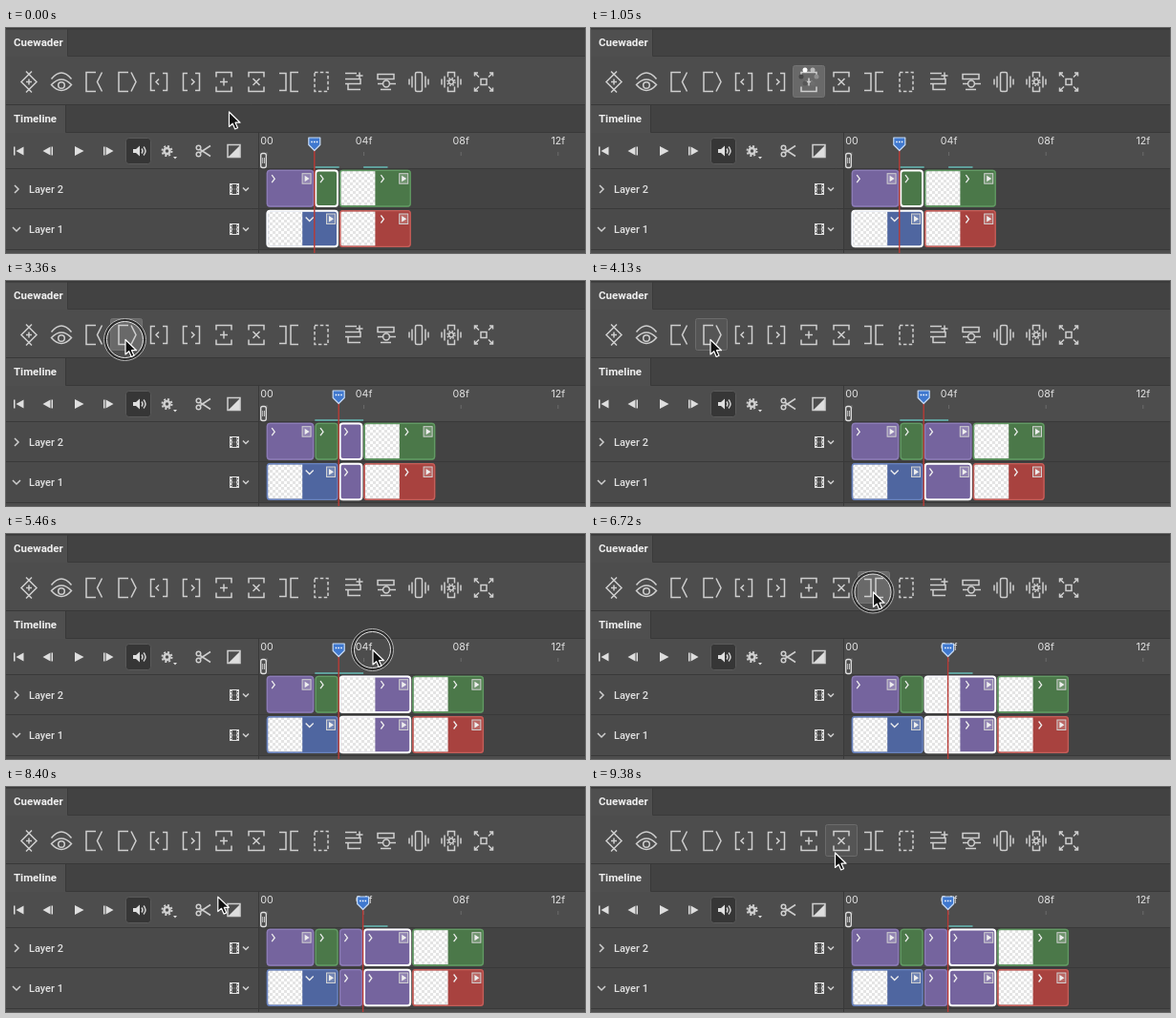
These frames come from a looping animation (606x236 px, 9.45 s). An HTML page:

```html
<!DOCTYPE html>
<html lang="en">
<head>
<meta charset="utf-8">
<title>Timeline panel</title>
<style>
  html, body { margin: 0; width: 100%; height: 100%; overflow: hidden; background: #4d4d4d; }
  svg { display: block; width: 606px; height: 236px; }
  text { font-family: Roboto, Inter, sans-serif; fill: #e2e2e2; }
  .tab { font-size: 11.5px; font-weight: 700; fill: #f0f0f0; }
  .layer { font-size: 11px; font-weight: 500; }
  .ruler { font-family: Inter, Roboto, sans-serif; font-size: 10.7px; text-anchor: middle; }
  .clip-name { font-size: 11px; font-weight: 700; fill: #fff; }
  .line { fill: none; stroke: #cfcfcf; stroke-width: 1.5; }
  .solid { fill: #dedede; }
</style>
</head>
<body>
<svg viewBox="0 0 606 236">
  <defs>
    <pattern id="checker" width="6" height="6" patternUnits="userSpaceOnUse">
      <rect width="6" height="6" fill="#fdfdfd"/>
      <path d="M0 0h3v3H0zM3 3H6V6H3z" fill="#e4e4e4"/>
    </pattern>
  </defs>

  <!-- panels -->
  <rect width="606" height="236" fill="#4d4d4d"/>
  <rect width="606" height="29" fill="#424242"/>
  <rect width="64" height="30" fill="#4f4f4f"/>
  <rect width="606" height="1.5" fill="#383838"/>
  <path d="M64.5 1V29.5H606" fill="none" stroke="#3a3a3a"/>
  <rect y="80" width="606" height="29" fill="#424242"/>
  <rect y="81" width="62" height="29" fill="#4f4f4f"/>
  <path d="M0 80.5H606M62.5 81V109.5H606" fill="none" stroke="#383838"/>
  <text class="tab" x="8" y="19">Cuewader</text>
  <text class="tab" x="8" y="99">Timeline</text>
  <rect y="148" width="264" height="84" fill="#4a4a4a"/>
  <rect x="265" y="148" width="341" height="84" fill="#434343"/>
  <path d="M264.5 110V236M0 147.5H606M0 189.5H606M0 232.5H606" stroke="#393939"/>

  <g id="hover"><rect x="-16.5" y="39.5" width="33" height="33" rx="2"/></g>
  <g id="tools" class="line"></g>

  <!-- transport controls -->
  <rect x="125.5" y="115.5" width="26" height="27" rx="3" fill="#363636" stroke="#5a5a5a"/>
  <g class="solid">
    <path d="M8 124.5h1.500v9H8zM18.500 124.500v9l-8-4.500z"/>
    <path d="M46.500 124.500v9l-8-4.500zM47.500 124.500H49v9h-1.500z"/>
    <path d="M72 124l9.500 5-9.500 5z"/>
    <path d="M102 124.500h1.500v9H102zM104.500 124.500v9l8-4.500z"/>
    <path d="M133 127h3l4-3.500v11l-4-3.500h-3z"/>
    <path d="M175 135h4l-2 2.500z"/>
    <path d="M245 123V136H232z"/>
  </g>
  <g class="line">
    <path d="M142 126.500q2 2.500 0 5M144 124.500q4 4.500 0 9"/>
    <circle cx="168.500" cy="129" r="3" stroke-width="2.600"/>
    <circle cx="168.500" cy="129" r="5" stroke-width="2" stroke-dasharray="2 1.927"/>
    <path d="M214 123.500L202.500 131M214 134.500L202.500 127"/>
    <circle cx="201.500" cy="125.500" r="2.300"/><circle cx="201.500" cy="132.500" r="2.300"/>
    <rect x="232" y="122.500" width="13" height="13"/>
    <path d="M9 165l4 4-4 4M7 209l4 4 4-4"/>
  </g>
  <text class="layer" x="24" y="173">Layer 2</text>
  <text class="layer" x="24" y="215">Layer 1</text>
  <g id="films"></g>

  <g id="ruler"></g>
  <rect x="266.700" y="131.500" width="5.600" height="15" rx="2" fill="#4d4d4d" stroke="#e0e0e0" stroke-width="1.300"/>
  <path d="M268.700 136v6M270.500 136v6" stroke="#e0e0e0" stroke-width=".8"/>

  <g id="clips"></g>

  <g id="playhead">
    <path d="M0 128V236" stroke="#b83a36" stroke-width="1.400"/>
    <path d="M-6 115H6V122.500L0 128.500L-6 122.500Z" fill="#3f78cf" stroke="#c6dbf7" stroke-width="1.200" stroke-linejoin="round"/>
    <path d="M-3.500 119.500h1.500M-.75 119.500h1.500M2 119.500h1.500" stroke="#fff" stroke-width="1.500"/>
  </g>

  <g id="pointer">
    <g id="ring" fill="none">
      <circle r="20.500" stroke="#2c2c2c" stroke-width="3"/>
      <circle r="22" stroke="#b5b5b5"/>
      <circle r="19" stroke="#e8e8e8"/>
    </g>
    <path d="M0 0V15.500L3.700 12.200L6.200 18L9 16.800L6.500 11.200H11.500Z" transform="translate(.5)"
      fill="#111" stroke="#fff" stroke-width="1.200" stroke-linejoin="round"/>
  </g>
  <g id="spinner"></g>
</svg>

<script>
const LOOP = 9450, STEP = 70, UNIT = 25.4;
const $ = id => document.getElementById(id);
const show = (el, on) => el.setAttribute("visibility", on ? "visible" : "hidden");
const place = (el, x, y) => el.setAttribute("transform", `translate(${x} ${y})`);
const path = d => `<path d="${d}"/>`;

// Toolbar glyphs, each drawn around its own centre
const plus = "M-4 0H4M0-4V4";
const sides = "M-4-9H-8.500V9H-4M4-9H8.500V9H4";
const frame = "M-8-5V-10H8V-5M-8 5V10H8V5";
const shake = "M-7-6V6M7-6V6M-10-3V3M10-3V3";
const glyphs = [
  path("M-3-11L8 0L-3 11M3-11L-8 0L3 11M-3 0H3M0-3V3"),
  path("M-10.500-3Q0-16 10.500-3M-10.500 3Q0-8 10.500 3Q0 15-10.500 3Z") + '<circle cy="3.500" r="3.3"/>',
  path("M2-10H-8V10H2M8.500-10L3.500 0L8.500 10"),
  path("M2-10H-8V10H2M5-10L10 0L5 10"),
  path(sides + "M0-3L-3 0L0 3"),
  path(sides + "M0-3L3 0L0 3"),
  path(frame + plus),
  path(frame + "M-3.500-3.500L3.500 3.500M-3.500 3.500L3.500-3.500"),
  path("M-10-9H-3V9H-10M10-10H2V10H10"),
  '<rect x="-7" y="-10" width="14" height="20" stroke-dasharray="3.5 2.300"/>',
  path("M-9-9H3M-9-3H7V2H-9M-6 2V8H7M6-10V-3M2.500-6.500H9.500"),
  path("M-9-8H8V-3H-9ZM-9 2H-4M4 2H10M-6 8H5") + '<circle cy="2" r="3.4"/>',
  '<rect x="-3.5" y="-10" width="7" height="20" rx="1.500"/>' + path(shake),
  path("M-3.500-5V-10H3.500V-5M-3.500 5V10H3.500V5" + shake) +
    '<circle r="2.400"/><circle r="4" stroke-dasharray="1.570"/>',
  path("M-9.500-6V-9.500H-6M6-9.500H9.500V-6M9.500 6V9.500H6M-6 9.500H-9.500V6M-9-9L-5-5M9-9L5-5M9 9L5 5M-9 9L-5 5") +
    '<rect x="-3" y="-3" width="6" height="6"/>'
];
$("tools").innerHTML = glyphs.map((g, i) => `<g transform="translate(${24 + 34 * i} 56.500)">${g}</g>`).join("");

$("films").innerHTML = [169, 211].map(y => `<g transform="translate(239 ${y})">
  <rect class="solid" x="-5" y="-6" width="10" height="12"/>
  <path d="M-2-4.500H2V-.7H-2zM-2 .7H2V4.500H-2zM-4-3.500h1M-4 0h1M-4 3.500h1M3-3.500h1M3 0h1M3 3.500h1" fill="#4a4a4a" stroke="#4a4a4a"/>
  <path class="line" d="M9-1.500L12 1.500L15-1.500"/></g>`).join("");

$("ruler").innerHTML = ["00", "04f", "08f", "12f"].map((label, i) => {
  const x = 273 + 4 * UNIT * i;
  return `<text class="ruler" x="${x}" y="121.700">${label}</text>
    <path d="M${x} 130v4" stroke="#6c6c6c"/>`;
}).join("");

$("spinner").innerHTML = [0, 1, 2, 3, 4, 5].map(i => {
  const a = i * Math.PI / 3;
  return `<circle cx="${8 * Math.cos(a)}" cy="${8 * Math.sin(a)}" r="2.500"/>`;
}).join("");

// Clips are written as colour, first frame, end frame; * marks the selection
const palette = {
  p: ["#75649e", "#8c7cb6"], g: ["#4b7849", "#629a64"],
  b: ["#4f66a0", "#6a83bd"], r: ["#a8423f", "#c45f5a"]
};
const scenes = [
  { at: 0, head: 2, cache: [[2, 3], [4, 5]], upper: "p0-2 g2-3* g3-6", lower: "b0-3* r3-6" },
  { at: 1260, head: 3, cache: [[2, 4]], upper: "p0-2 g2-3 p3-4* g4-7", lower: "b0-3 p3-4* r4-7" },
  { at: 3640, head: 3, cache: [[2, 4]], upper: "p0-2 g2-3 p3-5 g5-8", lower: "b0-3 p3-5* r5-8" },
  { at: 4620, head: 3, cache: [[2, 4]], upper: "p0-2 g2-3 p3-6* g6-9", lower: "b0-3 p3-6* r6-9" },
  { at: 5600, head: 4, cache: [[4, 5]], upper: "p0-2 g2-3 p3-6* g6-9", lower: "b0-3 p3-6* r6-9" },
  { at: 7280, head: 4, cache: [[4, 5]], upper: "p0-2 g2-3 p3-7* g7-10", lower: "b0-3 p3-4 p4-7 r7-10" },
  { at: 7840, head: 4, cache: [[4, 5]], upper: "p0-2 g2-3 p3-4 p4-6* g6-9", lower: "b0-3 p3-4 p4-6* r6-9" }
];

function clip(code, y) {
  const [, hue, from, to, picked] = code.match(/(\w)(\d+)-(\d+)(\*?)/);
  const [fill, edge] = palette[hue], length = to - from;
  const x = 272.700 + UNIT * from, right = 271.500 + UNIT * to, width = right - x;
  const chevronX = x + (length > 2 ? 45 : 7), chevronY = y + 9.500;
  let out = `<rect x="${x}" y="${y}" width="${width}" height="39" rx="3.500" fill="${fill}"/>`;
  if (length > 2) out += `<rect x="${x + 1.500}" y="${y + 1.500}" width="36" height="36" fill="url(#checker)"/>`;
  out += `<rect x="${x + 0.7}" y="${y + 0.7}" width="${width - 1.4}" height="37.600" rx="3" fill="none"
    stroke="${picked ? "#fff" : edge}" stroke-width="${picked ? 2 : 1.300}"/>`;
  const chevron = hue === "b" ? "M-4-2L0 2L4-2" : "M-1.500-4L1.500 0L-1.500 4";
  out += `<path transform="translate(${chevronX} ${chevronY})" d="${chevron}" fill="none" stroke="#eee" stroke-width="1.300"/>`;
  if (length > 1) out += `<g transform="translate(${right - 7.700} ${y + 9})">
    <rect x="-4.500" y="-5" width="9" height="10.500" fill="#fff3" stroke="#d0d0d0"/><path d="M-2-3L3 .2L-2 3.500Z" fill="#eee"/></g>`;
  if (length > 3) out += `<text class="clip-name" x="${x + 54}" y="${y + 13}">L…</text>`;
  return out;
}

for (const s of scenes) {
  const cached = s.cache.map(([a, b]) =>
    `<path d="M${272.500 + UNIT * a} 146H${272.500 + UNIT * b}" stroke="#5f9f9b" stroke-width="2"/>`);
  const row = (list, y) => list.split(" ").map(c => clip(c, y)).join("");
  s.markup = cached.join("") + row(s.upper, 148.700) + row(s.lower, 191);
}

// Pointer path: time, x, y
const route = [
  [70, 233, 88], [700, 228, 54], [1960, 228, 54], [2380, 404, 163], [2520, 404, 163],
  [2870, 152, 66], [3080, 124.500, 61.500], [4480, 124.500, 61.500], [4830, 92, 84], [5320, 383.500, 121.500],
  [5810, 383.500, 121.500], [6370, 295, 61], [7910, 295, 61], [8610, 201, 130], [9100, 201, 130], [9380, 255, 69]
];
const presses = [[770, 1050], [3220, 3430], [4200, 4410], [5390, 5670], [6510, 6790]];
const busy = [
  { from: 1050, to: 1680, x: 228, y: 51, button: 6, mark: 1540, dot: 3 },
  { from: 6790, to: 7840, x: 297, y: 66, button: 8, mark: 7700, dot: 0 }
];

function pointerAt(t) {
  const i = route.findIndex(p => p[0] >= t);
  if (i <= 0) return (i ? route[route.length - 1] : route[0]).slice(1);
  const [t0, x0, y0] = route[i - 1], [t1, x1, y1] = route[i];
  const u = (t - t0) / (t1 - t0), e = u * u * (3 - 2 * u);
  return [x0 + (x1 - x0) * e, y0 + (y1 - y0) * e];
}

const shades = ["#fff", "#bbb", "#8f8f8f", "#6e6e6e", "#575757", "#484848"];
let current;

function draw(now) {
  const t = Math.floor(now % LOOP / STEP) * STEP;
  const scene = scenes.filter(s => s.at <= t).pop();
  if (scene !== current) {
    current = scene;
    $("clips").innerHTML = scene.markup;
    place($("playhead"), 272 + UNIT * scene.head, 0);
  }

  const [x, y] = pointerAt(t);
  const pressed = presses.some(([a, b]) => t >= a && t < b);
  const job = busy.find(b => t >= b.from && t < b.to);
  place($("pointer"), x, y);
  show($("pointer"), !job);
  $("ring").setAttribute("opacity", pressed && !job ? 1 : 0);

  show($("spinner"), job);
  if (job) {
    place($("spinner"), job.x, job.y);
    const head = job.dot - Math.round((t - job.mark) / STEP);
    [...$("spinner").children].forEach((dot, i) =>
      dot.setAttribute("fill", shades[((i - head) % 6 + 6) % 6]));
  }

  const button = job ? job.button : Math.floor((x - 7) / 34);
  const over = job || (y >= 39 && y < 73 && button >= 0 && button < glyphs.length);
  const hover = $("hover");
  show(hover, over);
  place(hover, 24 + 34 * button, 0);
  hover.setAttribute("fill", job || pressed ? "#696969" : "#555");
  hover.setAttribute("stroke", job || pressed ? "#737373" : "#6b6b6b");
}

const start = performance.now();
function tick() {
  draw(performance.now() - start);
  requestAnimationFrame(tick);
}
tick();
</script>
</body>
</html>
```
